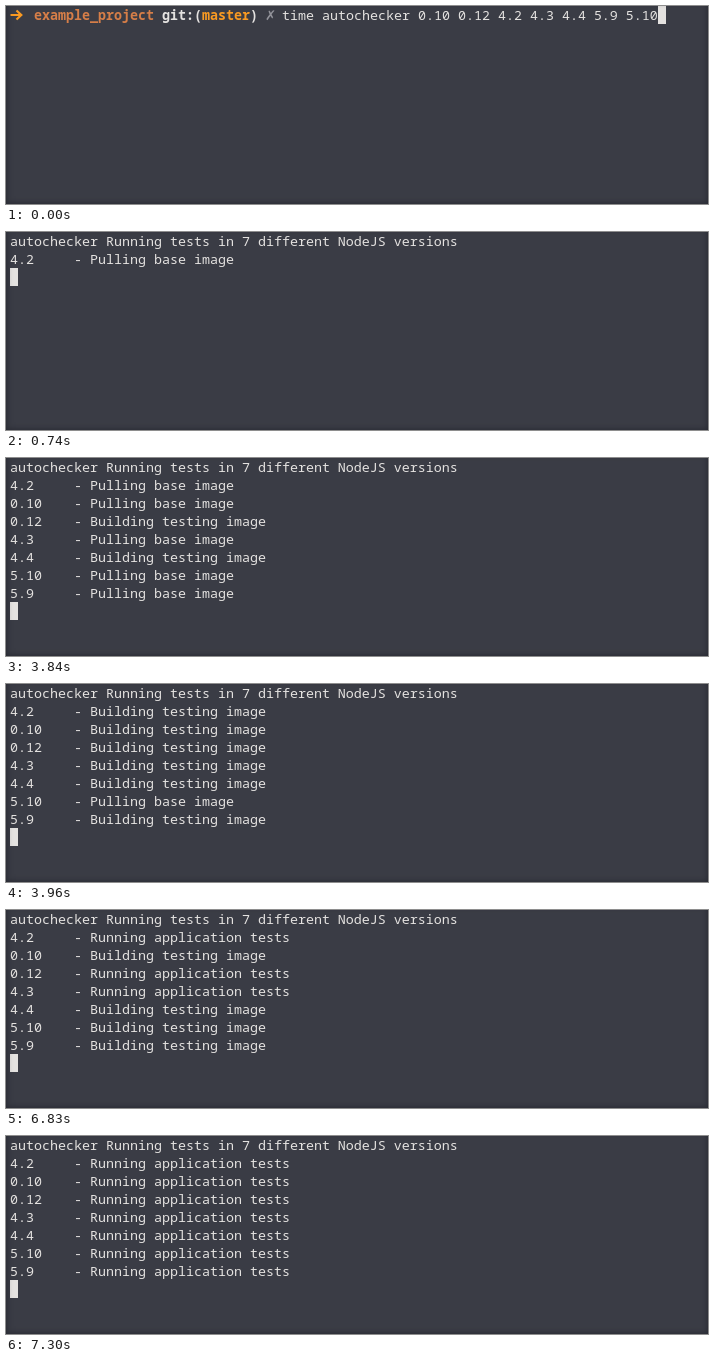
An HTML page for the animation above (8000 ms loop, 702 by 198 pixels).

```html
<!DOCTYPE html>
<html lang="en">
<head>
<meta charset="utf-8">
<title>Terminal test run</title>
<style>
  html, body { margin: 0; width: 100%; height: 100%; overflow: hidden; background: #3a3c45; }
  svg { display: block; width: 702px; height: 198px; }
  body::after {
    content: ""; position: absolute; left: 0; top: -4px; width: 702px; height: 202px;
    box-shadow: inset 0 0 6px rgba(18, 20, 28, .55); pointer-events: none;
  }
  text { font: 13.3333px "Noto Sans Mono", monospace; fill: #e4e2e0; white-space: pre; }
  .bold { font-weight: 700; }
  .dir { fill: #d67e48; }
  .branch { fill: #f99a22; }
  .cross { font-family: "DejaVu Sans", sans-serif; fill: #92939a; }
</style>
</head>
<body>
<svg id="stage" viewBox="0 0 702 198" xmlns="http://www.w3.org/2000/svg">
  <g id="prompt">
    <path d="M4.5 9H15M10.5 4.5L15.3 9L10.5 13.5" fill="none" stroke="#f99a22" stroke-width="2.2"/>
    <text class="bold dir" x="28" y="14">example_project</text>
    <text class="bold" x="156" y="14">git:(<tspan class="branch">master</tspan>)</text>
    <text class="cross" x="259" y="14">✗</text>
    <text x="276" y="14">time autochecker 0.10 0.12 4.2 4.3 4.4 5.9 5.10</text>
  </g>
  <g id="output">
    <text x="4" y="14">autochecker Running tests in 7 different NodeJS versions</text>
  </g>
  <rect id="cursor" width="8" height="18" fill="#e4e2e0"/>
</svg>
<script>
const LOOP = 8000, LINE = 18, LEFT = 4, OUTPUT_AT = 740;
const STAGES = ["Pulling base image", "Building testing image", "Running application tests"];

// Start time of each stage, per version
const jobs = [
  ["4.2",  740, 3960, 6830],
  ["0.10", 850, 3960, 7070],
  ["0.12", 850, 3840, 6830],
  ["4.3",  850, 3960, 6830],
  ["4.4",  850, 3840, 6950],
  ["5.10", 850, 4920, 7300],
  ["5.9",  850, 3960, 7180]
];

const byId = id => document.getElementById(id);
const prompt = byId("prompt"), output = byId("output"), cursor = byId("cursor");

const rows = jobs.map((_, i) => {
  const row = document.createElementNS("http://www.w3.org/2000/svg", "text");
  row.setAttribute("x", LEFT);
  row.setAttribute("y", 14 + LINE * (i + 1));
  output.append(row);
  return row;
});

function show(node, visible) {
  node.setAttribute("visibility", visible ? "visible" : "hidden");
}

function placeCursor(x, line) {
  cursor.setAttribute("x", x);
  cursor.setAttribute("y", line * LINE);
}

function render(t) {
  const running = t >= OUTPUT_AT;
  show(prompt, !running);
  show(output, running);

  let started = 0;
  jobs.forEach(([version, ...starts], i) => {
    const stage = starts.filter(start => t >= start).length;
    if (stage) started++;
    const label = stage ? version.padEnd(8) + "- " + STAGES[stage - 1] : "";
    if (rows[i].textContent !== label) rows[i].textContent = label;
  });

  if (t < 500) placeCursor(652, 0);
  else placeCursor(LEFT, started + 1);
}

const begin = performance.now();
function tick() {
  render((performance.now() - begin) % LOOP);
  requestAnimationFrame(tick);
}
tick();
</script>
</body>
</html>
```
